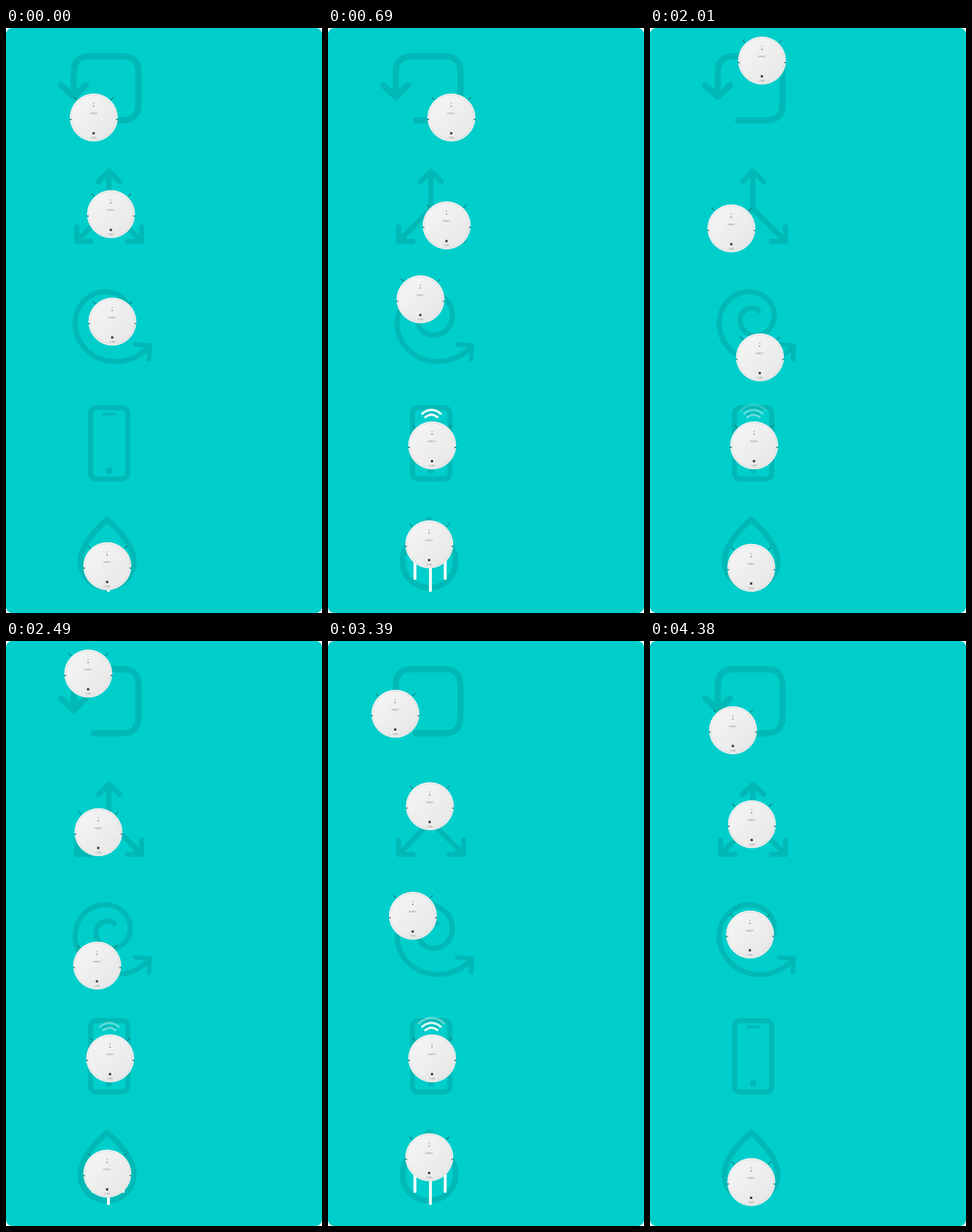
An HTML page for the animation above (4410 ms loop, 550 by 1017 pixels).

```html
<!DOCTYPE html>
<html lang="en">
<head>
<meta charset="utf-8">
<title>Cleaning modes</title>
<style>
html, body { margin: 0; width: 100%; height: 100%; overflow: hidden; background: #fff; }
svg { display: block; width: 100%; height: 100%; }
.icons { fill: none; stroke: #00b9b6; stroke-width: 10; stroke-linecap: round; stroke-linejoin: round; }
.white { fill: none; stroke: #fff; stroke-width: 4; stroke-linecap: round; }
text { font-family: "Liberation Sans", Arial, sans-serif; text-anchor: middle; }
</style>
</head>
<body>
<svg viewBox="0 0 550 1017">
  <defs>
    <linearGradient id="shell" x2="1" y2="1">
      <stop offset=".1" stop-color="#f5f5f5"/>
      <stop offset=".9" stop-color="#e7e7e7"/>
    </linearGradient>
    <g id="robot">
      <path d="M-29-31L-34-36M30-31L35-36" stroke="#147f80" stroke-width="1.500"/>
      <circle cx=".3" cy="-.4" r="41.300" fill="url(#shell)" stroke="#e9eeee"/>
      <circle cx=".3" cy="-.4" r="39" fill="none" stroke="#dedede"/>
      <path d="M-42 3H-38.500M39 3H42.500" stroke="#168c8c" stroke-width="1.800"/>
      <circle cy="-25" r="1.200" fill="#bbb"/>
      <circle cy="-20" r="1.200" fill="#888"/>
      <text y="-6" font-size="3.600" fill="#777">ROBOT</text>
      <rect x="-2" y="25" width="4" height="4" fill="#444"/>
      <text y="36" font-size="3" fill="#888">CLEAN</text>
    </g>
    <!-- routes of three robots -->
    <path id="square" d="M152.500 156H214Q228 156 228 142V71Q228 57 214 57H129Q117 57 117 71V143Q117 155.500 130 155.500H145"/>
    <path id="star" d="M182.500 324L214 350 177 319 140 350 177 319V275V319"/>
    <path id="mop" d="M176 936V889.500V943V892.500V941"/>
  </defs>

  <rect width="550" height="1017" rx="11" fill="#00cecb"/>

  <g class="icons">
    <path stroke-width="11" d="M153 160.500H203Q230.500 160.500 230.500 132V77Q230.500 49 203 49H146Q118 49 118 77V119M96 99.500L118 120 139 99.500"/>
    <path stroke-width="9" d="M179 314V250M161 267L179 249 198 267M179 314L123 371M123 346V371H148M179 314L236 371M211 371H236V346"/>
    <polyline id="coil" stroke-width="9"/>
    <path stroke-width="8" d="M225 550L250 552 249 576"/>
    <rect x="147" y="660" width="65" height="124" rx="10" stroke-width="9"/>
    <path stroke-width="5" d="M170 671H189"/>
    <circle cx="179.500" cy="769" r="6" fill="#00b9b6" stroke="none"/>
    <path d="M176 854.500C159 869 129.500 899 129.500 927A46.500 46 0 0 0 222.500 927C222.500 899 193 869 176 854.500Z"/>
  </g>

  <path class="white" stroke-width="5" style="stroke-width:5" d="M151.300 920V957M178.300 920V978M204 920V957"/>
  <g class="white" id="wifi">
    <path d="M169.500 676.500Q180 668 190.500 676.500"/>
    <path d="M164 670.500Q180 657 196 670.500"/>
    <path d="M158 664.500Q180 646 202 664.500"/>
  </g>

  <use id="squareBot" href="#robot"/>
  <use id="starBot" href="#robot"/>
  <use id="coilBot" href="#robot"/>
  <use id="phoneBot" href="#robot" x="181" y="726"/>
  <use id="mopBot" href="#robot"/>
</svg>
<script>
const LOOP = 4410, STEP = 30;
const $ = id => document.getElementById(id);
const clamp = v => Math.max(0, Math.min(1, v));

// Point on the coil; q counts quarter turns inward from the bottom
const coilPoint = (q, r) => ({
  x: 179.5 - r * Math.sin(q * Math.PI / 2),
  y: 505 + r * Math.cos(q * Math.PI / 2)
});

for (let q = -0.62; q < 6.4; q += 0.05) {
  const { x, y } = coilPoint(q, 74 * 0.79 ** q);
  $("coil").points.appendItem(Object.assign(document.querySelector("svg").createSVGPoint(), { x, y }));
}

// Linear value between [time, value] keys
function at(keys, t) {
  const i = Math.max(1, keys.findIndex(k => k[0] >= t));
  const [[t0, a], [t1, b]] = [keys[i - 1], keys[i]];
  return a + (b - a) * (t - t0) / (t1 - t0);
}

// Distance travelled along each route, then quarter turns on the coil
const travel = {
  square: [[0, 0], [690, 62], [1350, 126], [3240, 330], [3810, 368], [4380, 391]],
  star: [[0, 0], [690, 51], [1350, 96], [2970, 193], [4380, 274]],
  mop: [[0, 0], [690, 38], [1350, 67], [4380, 199]]
};
const turns = [[0, 3.53], [690, 1.67], [1350, 0.57], [2100, -0.2], [2970, 0.73], [3810, 2.16], [4380, 4.5]];

function place(id, { x, y }) {
  $(id).setAttribute("x", x);
  $(id).setAttribute("y", y);
}

function pulse(t, i) {
  if (t < 400 + 150 * i) return 0;
  const delay = i === 2 ? 300 : 0;
  const wave = 0.5 + 0.5 * Math.cos((t - 750 - delay) * 2 * Math.PI / 3000);
  const floor = [0.35, 0.3, 0][i];
  return floor + 0.62 * wave;
}

const start = performance.now();

function draw() {
  const t = Math.floor((performance.now() - start) % LOOP / STEP) * STEP;
  for (const id in travel) place(id + "Bot", $(id).getPointAtLength(at(travel[id], t)));

  const q = at(turns, t);
  place("coilBot", coilPoint(q, Math.max(8, 67 - 17.4 * q)));

  const shown = clamp((t - 100) / 250) * clamp((4250 - t) / 250);
  $("phoneBot").setAttribute("opacity", shown);
  [...$("wifi").children].forEach((arc, i) => arc.setAttribute("opacity", shown * pulse(t, i)));
  requestAnimationFrame(draw);
}
draw();
</script>
</body>
</html>
```
